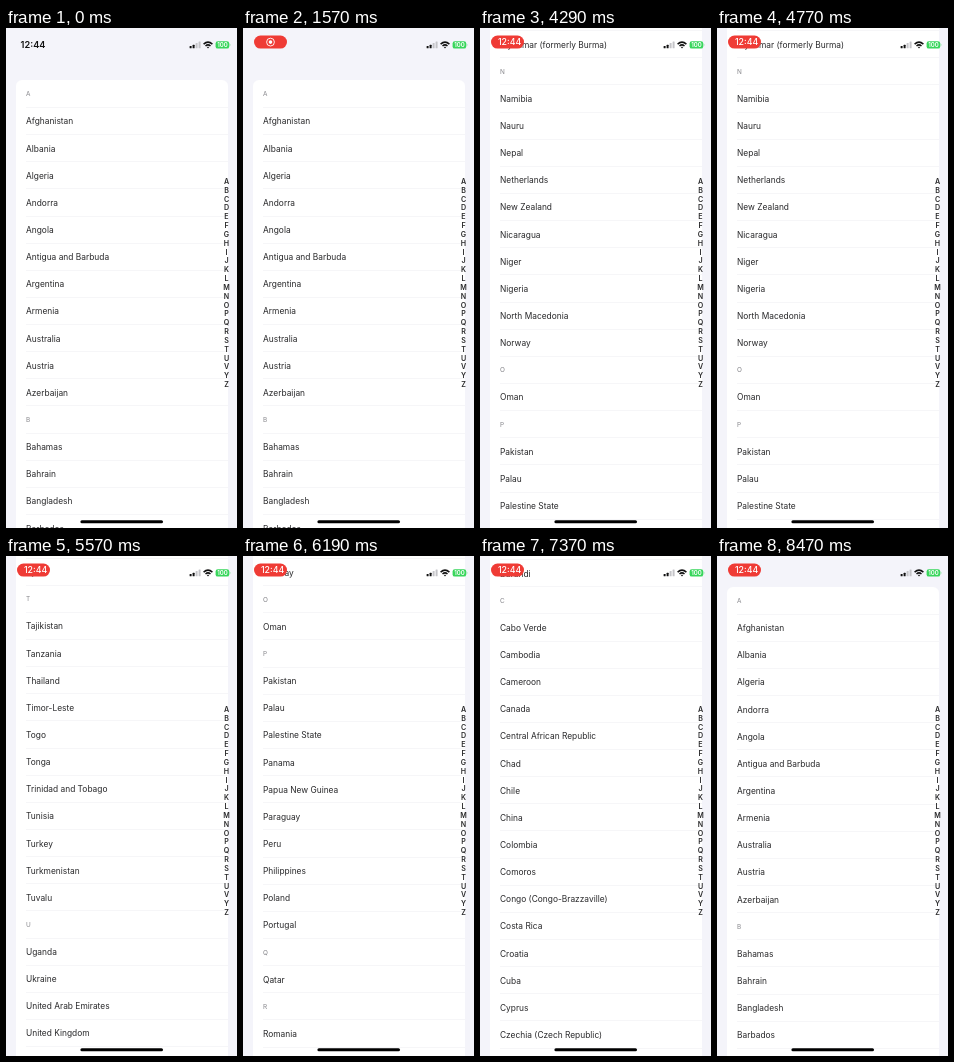
Animation of 231 by 500 pixels, one loop 8.57 s. Source, as an HTML page:

```html
<!DOCTYPE html>
<html lang="en">
<head>
<meta charset="utf-8">
<title>Country list</title>
<style>
  :root { --loop: 8570ms; --row: 27.15px; }
  html, body { margin: 0; width: 100%; height: 100%; overflow: hidden; background: #f4f4fa; }
  body { position: relative; font: 8.4px Inter, Roboto, sans-serif; color: #28282a; }
  #card {
    position: absolute; left: 10px; top: 0; width: 212px;
    background: #fff; border-radius: 6px;
  }
  .row {
    position: relative; height: var(--row); line-height: calc(var(--row) + 2.2px);
    padding-left: 10px; white-space: nowrap;
  }
  .row::after {
    content: ""; position: absolute; left: 10px; right: 0; bottom: -.5px;
    height: 1px; background: #f6f6f8;
  }
  .head { font-size: 6.4px; color: #85858a; }
  #index {
    position: absolute; left: 214px; top: 150px; width: 13px;
    text-align: center; font-size: 7.1px; font-weight: 600; line-height: 8.83px;
  }
  #index div { height: 8.83px; }
  #bar { position: absolute; left: 0; top: 0; }
  #bar text { font-family: Inter, Roboto, sans-serif; text-anchor: middle; }
  #pill, #icon, #clock, #live { animation: var(--loop) linear infinite both; }
  #pill { animation-name: pill; transform-origin: 27.5px 14.2px; }
  #icon { animation-name: icon; }
  #clock { animation-name: clock; }
  #live { animation-name: live; }
  @keyframes pill {
    0%, 1.1% { opacity: 0; transform: scale(.5); animation-timing-function: ease-out; }
    4.7% { opacity: 1; transform: scale(1.1); animation-timing-function: ease-in-out; }
    9%, 100% { opacity: 1; transform: none; }
  }
  @keyframes clock {
    0%, 1.1% { opacity: 1; }
    3.5%, 100% { opacity: 0; }
  }
  @keyframes icon {
    0%, 2.3% { opacity: 0; }
    5.8%, 19% { opacity: 1; }
    21%, 100% { opacity: 0; }
  }
  @keyframes live {
    0%, 19.8% { opacity: 0; }
    22.2%, 100% { opacity: 1; }
  }
</style>
</head>
<body>
<div id="card"></div>
<div id="index"></div>
<svg id="bar" width="231" height="500" viewBox="0 0 231 500">
  <text id="clock" x="27" y="20.4" font-size="9.2" font-weight="600" fill="#111">12:44</text>
  <g id="pill">
    <rect x="11" y="7.6" width="33" height="13" rx="6.5" fill="#ef3b35"/>
    <g id="icon">
      <circle cx="27.5" cy="14.1" r="3.9" fill="none" stroke="#fff" stroke-width=".9"/>
      <circle cx="27.5" cy="14.1" r="1.8" fill="#fff"/>
    </g>
    <text id="live" x="29.6" y="17.3" font-size="8.8" font-weight="500" fill="#fff">12:44</text>
  </g>
  <g fill="#111">
    <rect x="183.6" y="17.9" width="2" height="2.4" rx=".5"/>
    <rect x="186.6" y="16.7" width="2" height="3.6" rx=".5"/>
    <g fill="#c4c4c8">
      <rect x="189.6" y="15.1" width="2" height="5.2" rx=".5"/>
      <rect x="192.6" y="13.5" width="2" height="6.8" rx=".5"/>
    </g>
  </g>
  <g fill="none" stroke="#111" stroke-width="1.5">
    <path d="M197.6 16.1Q202 12.1 206.4 16.1"/>
    <path d="M199.5 18Q202 15.8 204.5 18"/>
  </g>
  <path d="M200.8 19.1Q202 18.2 203.2 19.1L202 20.5Z" fill="#111"/>
  <rect x="209.6" y="13.2" width="13.6" height="7.4" rx="2.2" fill="#39d65c"/>
  <path d="M223.8 15.5q1.2 1.4 0 2.8z" fill="#39d65c"/>
  <text x="216.4" y="19.1" font-size="6" font-weight="600" fill="#fff">100</text>
  <rect x="74.4" y="492.2" width="82.6" height="3" rx="1.5" fill="#000"/>
</svg>
<script>
const LOOP = 8570, ROW = 27.15, HOME = 52.3, PINNED = 31;

const countries = `Afghanistan,Albania,Algeria,Andorra,Angola,Antigua and Barbuda,Argentina,Armenia,Australia,Austria,Azerbaijan,
Bahamas,Bahrain,Bangladesh,Barbados,Belarus,Belgium,Belize,Benin,Bhutan,Bolivia,Bosnia and Herzegovina,Botswana,Brazil,Brunei,Bulgaria,Burkina Faso,Burundi,
Cabo Verde,Cambodia,Cameroon,Canada,Central African Republic,Chad,Chile,China,Colombia,Comoros,Congo (Congo-Brazzaville),Costa Rica,Croatia,Cuba,Cyprus,Czechia (Czech Republic),
Democratic Republic of the Congo,Denmark,Djibouti,Dominica,Dominican Republic,
Ecuador,Egypt,El Salvador,Equatorial Guinea,Eritrea,Estonia,Eswatini,Ethiopia,
Fiji,Finland,France,
Gabon,Gambia,Georgia,Germany,Ghana,Greece,Grenada,Guatemala,Guinea,Guinea-Bissau,Guyana,
Haiti,Holy See,Honduras,Hungary,
Iceland,India,Indonesia,Iran,Iraq,Ireland,Israel,Italy,Ivory Coast,
Jamaica,Japan,Jordan,
Kazakhstan,Kenya,Kiribati,Kuwait,Kyrgyzstan,
Laos,Latvia,Lebanon,Lesotho,Liberia,Libya,Liechtenstein,Lithuania,Luxembourg,
Madagascar,Malawi,Malaysia,Maldives,Mali,Malta,Marshall Islands,Mauritania,Mauritius,Mexico,Micronesia,Moldova,Monaco,Mongolia,Montenegro,Morocco,Mozambique,Myanmar (formerly Burma),
Namibia,Nauru,Nepal,Netherlands,New Zealand,Nicaragua,Niger,Nigeria,North Macedonia,Norway,
Oman,
Pakistan,Palau,Palestine State,Panama,Papua New Guinea,Paraguay,Peru,Philippines,Poland,Portugal,
Qatar,
Romania,Russia,Rwanda,
Saint Kitts and Nevis,Saint Lucia,Saint Vincent and the Grenadines,Samoa,San Marino,Sao Tome and Principe,Saudi Arabia,Senegal,Serbia,Seychelles,Sierra Leone,Singapore,Slovakia,Slovenia,Solomon Islands,Somalia,South Africa,South Korea,South Sudan,Spain,Sri Lanka,Sudan,Suriname,Sweden,Switzerland,Syria,
Tajikistan,Tanzania,Thailand,Timor-Leste,Togo,Tonga,Trinidad and Tobago,Tunisia,Turkey,Turkmenistan,Tuvalu,
Uganda,Ukraine,United Arab Emirates,United Kingdom,United States of America,Uruguay,Uzbekistan,
Vanuatu,Venezuela,Vietnam,
Yemen,
Zambia,Zimbabwe`.split(/,\s*/);

const card = document.getElementById("card");
const index = document.getElementById("index");
const sectionRow = {};

function add(parent, text, cls = "") {
  const el = document.createElement("div");
  el.className = cls;
  el.textContent = text;
  parent.append(el);
}

for (const name of countries) {
  const letter = name[0];
  if (!(letter in sectionRow)) {
    sectionRow[letter] = card.children.length;
    add(card, letter, "row head");
    add(index, letter);
  }
  add(card, name, "row");
}

// A finger drags along the index: each run jumps one section per step.
const stops = [];
const drag = (start, step, letters) =>
  [...letters].forEach((letter, i) => stops.push([start + i * step, letter]));

drag(2070, 100, "BCDEFGHIJ");
drag(3070, 100, "KLMN");
drag(4890, 100, "OQ");
drag(5170, 200, "RSTS");
drag(5870, 100, "RQP");
drag(6190, 100, "OMLJHFE");
drag(6870, 400, "DC");
drag(7870, 200, "BA");

// Hard jumps: every pose holds until the next one.
const pose = (time, y) => ({
  offset: time / LOOP, top: `${y}px`, easing: "step-end"
});
const poses = stops.map(([time, letter]) => pose(time, PINNED - sectionRow[letter] * ROW));
card.animate(
  [pose(0, HOME), ...poses, pose(LOOP, PINNED)],
  { duration: LOOP, iterations: Infinity }
);
</script>
</body>
</html>
```
